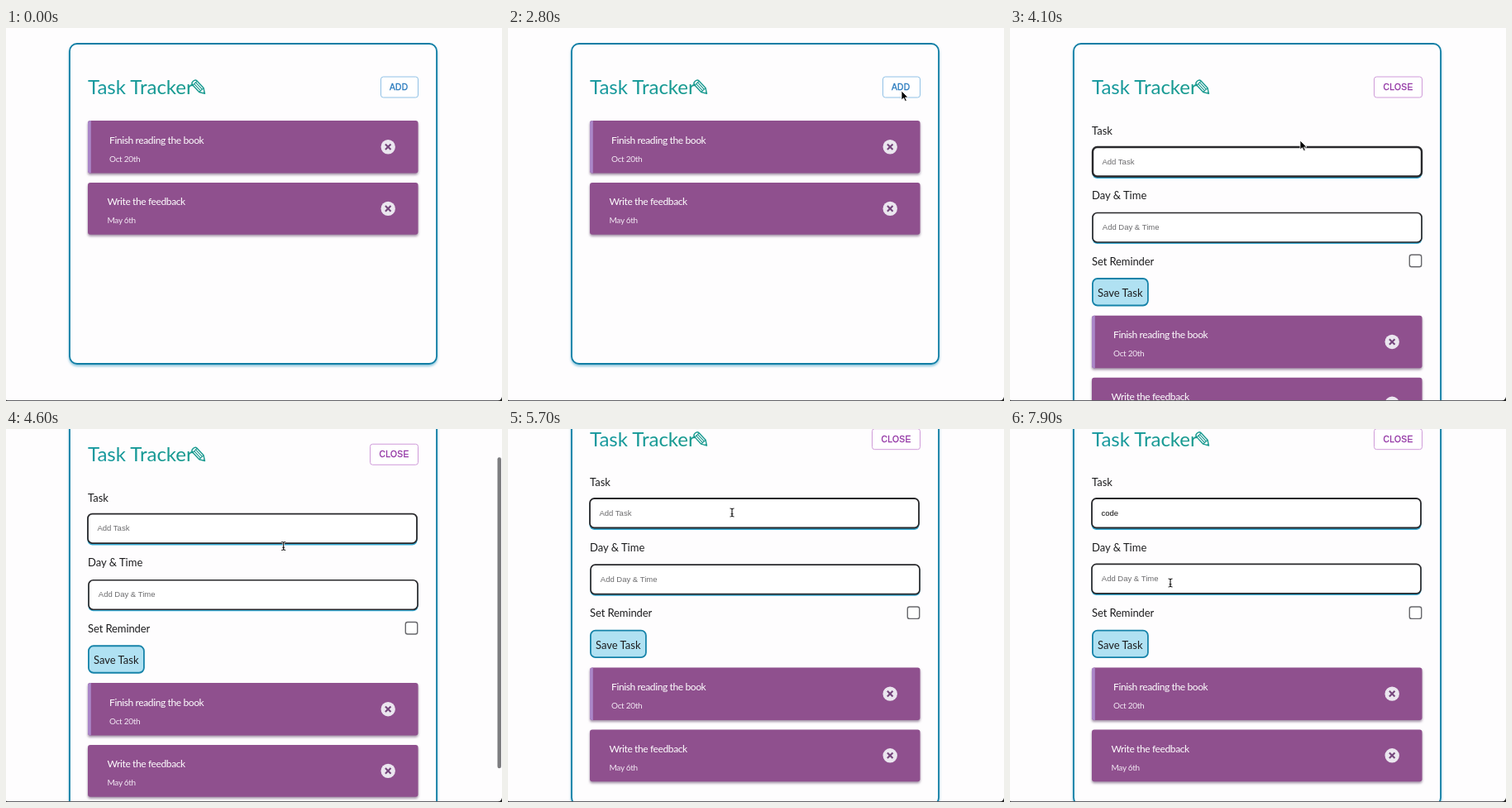
Recreate the animation shown at these times as an HTML page. Size 600 by 451 pixels, loop 8 s.

```html
<!DOCTYPE html>
<html lang="en">
<head>
<meta charset="utf-8">
<title>Task Tracker</title>
<style>
html, body { margin: 0; width: 100%; height: 100%; overflow: hidden; background: #fefdfe; }
svg { display: block; width: 600px; height: 451px; }
text { font-family: Lato, "Open Sans", sans-serif; white-space: pre; }
.label { font-size: 13px; fill: #1c1c1e; }
.name { font-size: 12px; letter-spacing: -.38px; fill: #fff; }
.date { font-size: 10px; letter-spacing: -.3px; fill: #f3e9f4; }
.ui { font-family: "Liberation Sans", Arial, sans-serif; font-size: 9.5px; fill: #6b6b6d; }
.button text { font-family: "Liberation Sans", Arial, sans-serif; font-size: 10.2px; letter-spacing: .3px; stroke-width: .3px; }
.add text { fill: #2779bd; stroke: #2779bd; }
.add rect { fill: #fff; stroke: #90c1e6; }
.close text { fill: #9132a3; stroke: #9132a3; }
.close rect { fill: #fff; stroke: #cf9bd9; }
.panel { filter: drop-shadow(0 2px 1.5px #4aa5c8aa); }
.card { filter: drop-shadow(0 2px 1.5px #57396090); }
.field { fill: #fff; stroke: #28282b; }
</style>
</head>
<body>
<svg viewBox="0 0 600 451">
  <defs>
    <linearGradient id="teal" gradientUnits="userSpaceOnUse" x1="99" y1="0" x2="241" y2="0">
      <stop offset="0" stop-color="#1899a0"/><stop offset="1" stop-color="#169a8b"/>
    </linearGradient>
  </defs>
  <rect width="600" height="451" fill="#fefdfe"/>

  <g id="page">
    <rect id="panel" class="panel" x="77" y="19" width="444" height="387" rx="9" fill="#fefdfe" stroke="#117ea5" stroke-width="1.8"/>
    <text x="99" y="80" font-size="24" fill="url(#teal)">Task Tracker</text>
    <g transform="translate(227.5 65.5) rotate(47)" fill="none" stroke="url(#teal)" stroke-width="1.4" stroke-linejoin="round">
      <path d="M1 -3.6H13L19 0L13 3.6H1Q-1.6 3.6 -1.6 0T1 -3.6Z" stroke="#17998f"/>
      <path d="M1 -1.2H13M1 1.2H13M1.6 -3.6V3.6M13 -3.6V3.6M17 -.8V.8" stroke="#17998f" stroke-width="1.1"/>
    </g>

    <g id="add" class="button add">
      <rect x="453.5" y="59" width="45" height="25" rx="3"/>
      <text x="464" y="75">ADD</text>
    </g>
    <g id="close" class="button close">
      <rect x="440.5" y="59" width="58" height="25" rx="3"/>
      <text x="451.5" y="75">CLOSE</text>
    </g>

    <g id="form">
      <text class="label" x="99" y="128.5">Task</text>
      <g id="task">
        <rect x="99.5" y="145" width="399" height="37" rx="6" fill="#36a9d2"/>
        <rect id="taskBox" class="field" x="100" y="144" width="398" height="35.5" rx="5.5"/>
        <text id="taskText" class="ui" x="111.5" y="164.5"></text>
        <rect id="caret" y="156.5" width="1" height="10.5" fill="#111"/>
      </g>
      <text class="label" x="99" y="207">Day &amp; Time</text>
      <g id="day">
        <rect x="99.5" y="224.5" width="399" height="36.5" rx="6" fill="#36a9d2"/>
        <rect class="field" x="100" y="223.5" width="398" height="35.5" rx="5.5" stroke-width="1.7"/>
        <text class="ui" x="111.8" y="244">Add Day &amp; Time</text>
      </g>
      <text class="label" x="99" y="286.5" letter-spacing="-.1">Set Reminder</text>
      <rect x="483.3" y="274.3" width="14.4" height="14.4" rx="2.5" fill="#fff" stroke="#68686c" stroke-width="1.4"/>
      <rect x="99.9" y="303" width="67" height="32.5" rx="6" fill="#b0e1f2" stroke="#1683a9" stroke-width="1.8"/>
      <text class="label" x="106" y="325">Save Task</text>
    </g>

    <g id="cards"></g>
  </g>

  <rect id="bar" x="594.5" width="4.5" height="376" rx="2.2" fill="#7d7d80"/>
  <path d="M0 450H600V451H0Z" fill="#626266"/>
  <path d="M600 446Q599 450 595 451H600ZM0 449Q0 451 2 451H0Z" fill="#222"/>

  <g id="arrow">
    <path d="M0 0V11L2.6 8.7L4.5 12.6L6.3 11.8L4.5 8H8Z" fill="#000" stroke="#fff" stroke-width=".8"/>
  </g>
  <g id="beam" fill="none">
    <path d="M-2.5 -5Q0 -5 0 -3.6Q0 -5 2.5 -5M0 -4V4M-2.5 5Q0 5 0 3.6Q0 5 2.5 5M-1.4 1.8H1.4" stroke="#fff" stroke-width="2.2"/>
    <path d="M-2.5 -5Q0 -5 0 -3.6Q0 -5 2.5 -5M0 -4V4M-2.5 5Q0 5 0 3.6Q0 5 2.5 5M-1.4 1.8H1.4" stroke="#111" stroke-width="1.1"/>
  </g>
</svg>
<script>
const LOOP = 8000, OPEN = 3200, FOCUS = 5950, FORM_HEIGHT = 235.7, SCROLL = 59.3;
const el = id => document.getElementById(id);
const show = (id, on) => el(id).setAttribute('visibility', on ? 'visible' : 'hidden');
const move = (id, x, y) => el(id).setAttribute('transform', `translate(${x} ${y})`);
const clamp = v => Math.max(0, Math.min(1, v));
const ease = v => v * v * (3 - 2 * v);
const span = (t, a, b) => clamp((t - a) / (b - a));

function card(y, height, name, date, x, marked) {
  const cy = y + height / 2;
  const mark = marked ? `<path d="M102.8 ${y}H102Q99 ${y} 99 ${y + 3}V${y + height - 3}Q99 ${y + height} 102 ${y + height}H102.8Z" fill="#aa86c8"/>` : '';
  return `<g class="card"><rect x="99" y="${y}" width="399.5" height="${height}" rx="3" fill="#8f508e"/>${mark}</g>
    <text class="name" x="${x}" y="${cy - 4}">${name}</text>
    <text class="date" x="${x}" y="${cy + 18}">${date}</text>
    <circle cx="462.2" cy="${cy}" r="8.7" fill="#ebe6ef"/>
    <path d="M458.9 ${cy - 3.3}l6.6 6.6m0 -6.6l-6.6 6.6" stroke="#75467c" stroke-width="2.1"/>`;
}
el('cards').innerHTML =
  card(112, 63.5, 'Finish reading the book', 'Oct 20th', 125, true) +
  card(187, 62.8, 'Write the feedback', 'May 6th', 122.5, false);

// time, x, y
const pointer = [
  [1500, 533, 372], [1900, 527, 340], [2300, 495, 150], [2600, 476, 76],
  [3300, 476, 76], [4100, 351, 136], [4450, 337, 141], [4900, 332, 143],
  [5200, 330, 142], [5650, 271, 101], [7400, 271, 101], [7850, 194, 186]
];
function pointerAt(t) {
  const i = pointer.findIndex(p => p[0] > t);
  if (i < 0) return pointer[pointer.length - 1].slice(1);
  if (i === 0) return pointer[0].slice(1);
  const [ta, xa, ya] = pointer[i - 1], [tb, xb, yb] = pointer[i];
  const k = ease((t - ta) / (tb - ta));
  return [xa + (xb - xa) * k, ya + (yb - ya) * k];
}

const keys = [6700, 6900, 7100, 7400];

function draw(t) {
  const open = t >= OPEN;
  const scroll = SCROLL * ease(span(t, 4350, 4750));
  move('page', 0, -scroll);
  move('cards', 0, open ? FORM_HEIGHT : 0);
  el('panel').setAttribute('height', open ? 495 : 387);
  show('form', open);
  show('add', !open);
  show('close', open);

  const lifted = t >= 4350;
  move('task', lifted ? -1 : 0, lifted ? -.7 : 0);
  el('taskBox').setAttribute('stroke-width', lifted ? 1.8 : 2.4);
  const hover = t >= 7700;
  move('day', hover ? -1 : 0, hover ? -.8 : 0);

  const typed = 'code'.slice(0, keys.filter(k => t >= k).length);
  const text = el('taskText');
  text.textContent = typed || 'Add Task';
  text.style.fill = typed ? '#111' : '';
  const lastKey = [FOCUS, ...keys].filter(k => t >= k).pop();
  show('caret', lastKey !== undefined && (t - lastKey) % 1000 < 500);
  el('caret').setAttribute('x', 111.5 + (typed ? text.getComputedTextLength() : 0));

  el('bar').setAttribute('y', 4 + 44 * scroll / SCROLL);
  el('bar').setAttribute('opacity', span(t, 4300, 4400) * (1 - span(t, 5400, 5600)));

  const [x, y] = pointerAt(t);
  const visible = t >= 1500 && (t < keys[0] || t >= 7450);
  const overText = t >= 4300;
  show('arrow', visible && !overText);
  show('beam', visible && overText);
  move('arrow', x, y);
  move('beam', x, y);
}

const start = performance.now();
function tick() {
  draw((performance.now() - start) % LOOP);
  requestAnimationFrame(tick);
}
tick();
</script>
</body>
</html>
```
